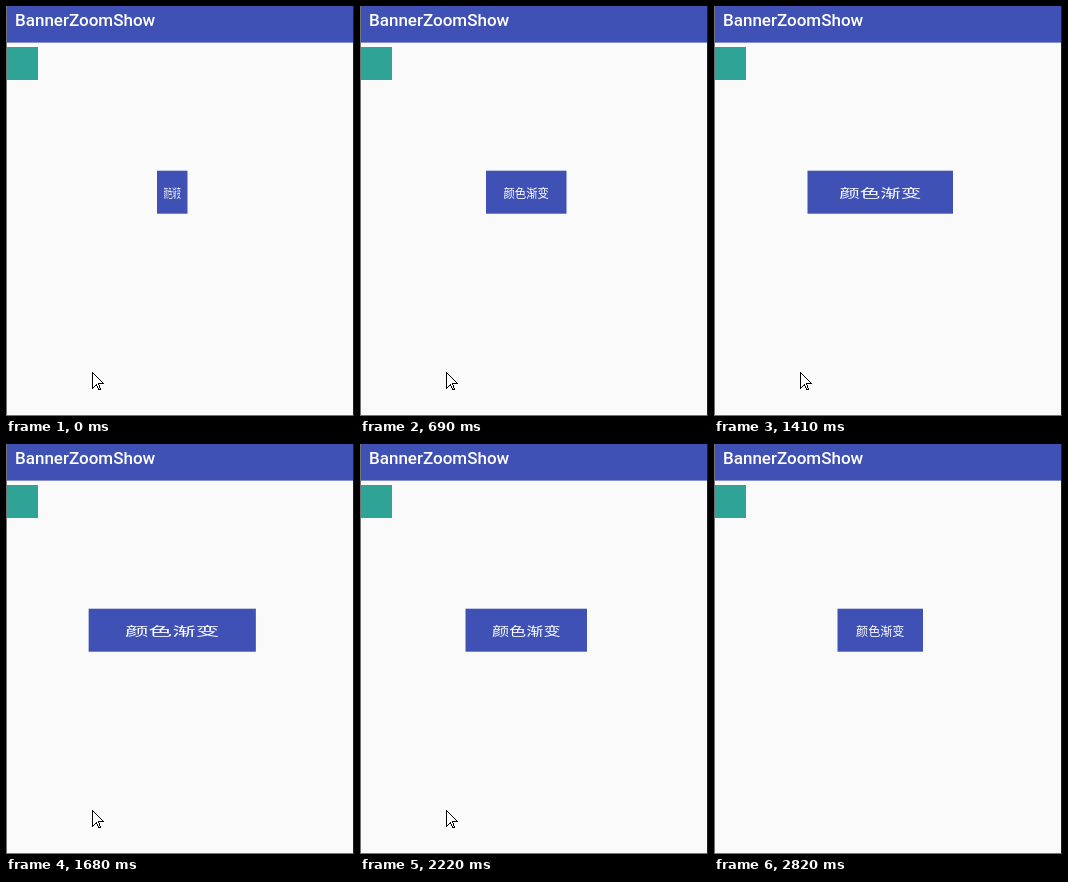
Write an HTML page that moves like this. It is 348 by 410 pixels and loops after 3540 ms.

```html
<!DOCTYPE html>
<html lang="zh-CN">
<head>
<meta charset="utf-8">
<title>Button stretch</title>
<style>
  html, body { margin: 0; width: 100%; height: 100%; overflow: hidden; }
  #stage { position: relative; width: 348px; height: 410px; overflow: hidden; background: #fafafa; }
  #stage > * { position: absolute; box-sizing: border-box; }
  #bar {
    left: 0; top: 0; width: 348px; height: 37px; padding-left: 9px;
    background: linear-gradient(#3f51b5 36px, #8791cf 36px); color: #fff; white-space: nowrap;
    font: 500 17px/28px Roboto, sans-serif;
  }
  #icon { left: -1px; top: 41px; width: 33px; height: 33px; background: #2fa496; }
  #button {
    left: 0; top: 0; width: 85px; height: 43px; transform-origin: 0 0;
    background: #3f51b5; color: #fff; text-align: center; white-space: nowrap;
    font: 500 12px/43px "Noto Sans CJK SC", "Noto Sans CJK", sans-serif;
  }
  #cursor { left: 0; top: 0; width: 13px; height: 20px; overflow: visible; }
  #frame { inset: 0; border: solid #737373; border-width: 0 1px 1px; border-right-color: #202020; }
</style>
</head>
<body>
<div id="stage">
  <div id="bar">BannerZoomShow</div>
  <div id="icon"></div>
  <div id="button">颜色渐变</div>
  <svg id="cursor"><path d="M.5 .5V16.5L4.5 12.5L6.5 17.5H8.5L6.5 11.5H11.5Z" fill="#fff" stroke="#000" shape-rendering="crispEdges"/></svg>
  <div id="frame"></div>
</div>
<script>
  const LOOP = 3540;
  const STOP = 2670;       // the button comes to rest
  const HIDE = 2820;       // the pointer disappears
  const BASE_WIDTH = 85;
  const CENTER = 166.25;
  const TOP = 164.7;

  // Key points of the stretch: [ms, width], linear in between.
  const keys = [[0, 30.5], [690, 80.5], [1410, 145.5], [1690, 168], [2070, 141.5], [2220, 121.5], [STOP, 85.5]];

  // The picture advances every 120 ms, with some longer holds of 150 ms.
  const longHolds = [0, 150, 540, 1410];
  const holdAt = t => t >= 1920 || longHolds.includes(t) ? 150 : 120;
  const ticks = [];
  for (let t = 0; t <= STOP; t += holdAt(t)) ticks.push(t);

  const button = document.getElementById("button");
  const cursor = document.getElementById("cursor");

  function widthAt(t) {
    const i = keys.findIndex(([end]) => end >= t);
    if (i <= 0) return keys[0][1];
    const [t0, w0] = keys[i - 1];
    const [t1, w1] = keys[i];
    return w0 + (w1 - w0) * (t - t0) / (t1 - t0);
  }

  function draw(t) {
    const width = widthAt(ticks.findLast(tick => tick <= t));
    button.style.transform =
      `translate(${CENTER - width / 2}px, ${TOP}px) scaleX(${width / BASE_WIDTH})`;
    cursor.style.visibility = t < HIDE ? "visible" : "hidden";
    cursor.style.transform = t < STOP ? "translate(86px, 366px)" : "translate(124px, 316px)";
  }

  const origin = performance.now();
  function play() {
    draw((performance.now() - origin) % LOOP);
    requestAnimationFrame(play);
  }
  play();
</script>
</body>
</html>
```
